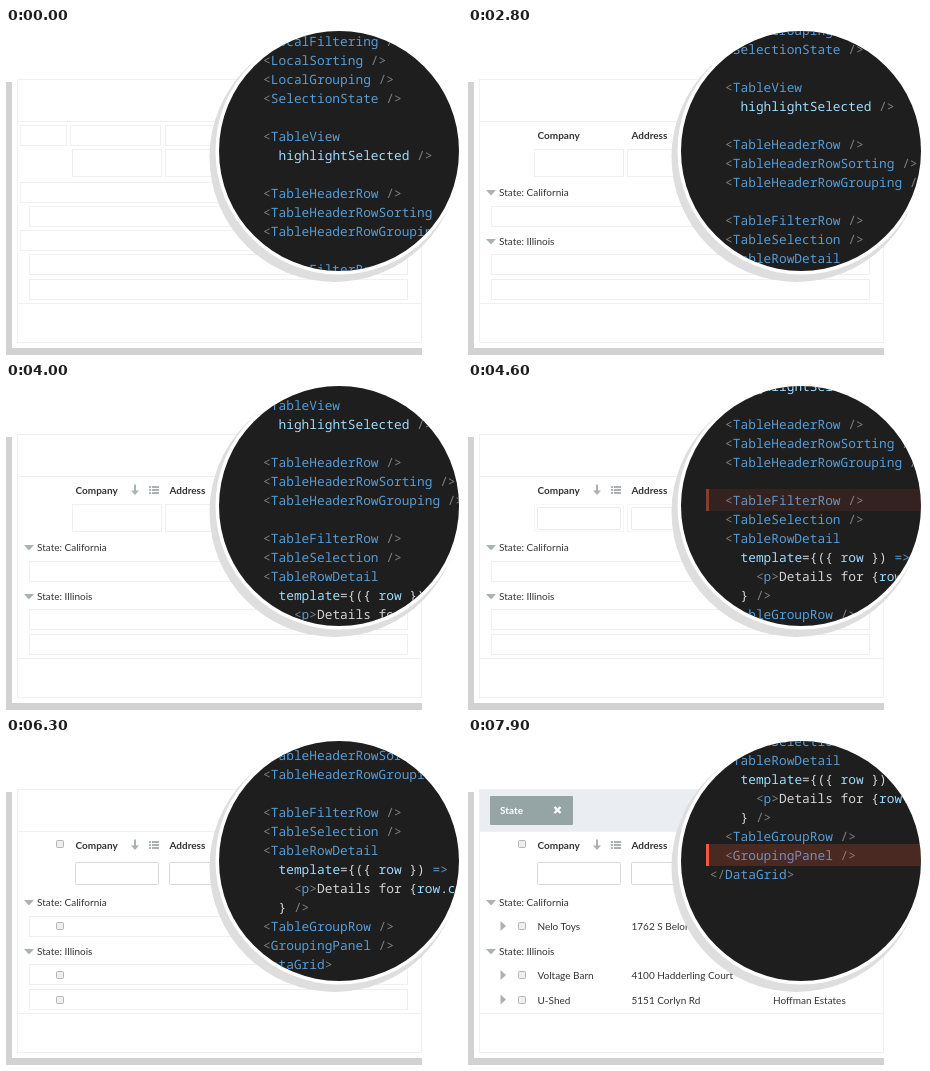
Recreate the animation shown at these times as an HTML page. Size 456 by 327 pixels, loop 8000 ms.

```html
<!DOCTYPE html>
<html lang="en">
<head>
<meta charset="utf-8">
<title>Data grid features</title>
<style>
  html, body { margin: 0; width: 100%; height: 100%; overflow: hidden; background: #fff; }
  svg { display: block; }
  text { white-space: pre; }
  .ui { font: 10px Lato, sans-serif; fill: #333; }
  .bold { font-weight: 700; }
  .code { font: 12.83px "Noto Sans Mono", "DejaVu Sans Mono", monospace; text-rendering: geometricPrecision; }
  .ghost { fill: none; stroke: #f0f0f0; }
  .icon { fill: #abb2b6; }
</style>
</head>
<body>
<svg id="stage" width="456" height="327" viewBox="0 0 456 327">
  <defs><clipPath id="lens"><circle cx="333" cy="123" r="120"/></clipPath></defs>
  <path d="M0 54H6V320H416V327H0Z" fill="#d2d2d2"/>
  <g id="grid"></g>
  <circle cx="328.5" cy="129" r="125" fill="#dedede"/>
  <circle cx="333" cy="123" r="123.5" fill="#fff"/>
  <circle cx="333" cy="123" r="120" fill="#1e1e1e"/>
  <g clip-path="url(#lens)">
    <g id="code"></g>
    <g id="mark">
      <rect class="band" x="238" width="218" fill="#f05037" fill-opacity=".21"/>
      <rect class="band" x="238" width="3" fill="#f25a3c"/>
    </g>
  </g>
</svg>
<script>
const LOOP = 8000, STEP = 100;
const $ = id => document.getElementById(id);

function add(parent, name, attrs = {}, text) {
  const el = document.createElementNS("http://www.w3.org/2000/svg", name);
  for (const key in attrs) el.setAttribute(key, attrs[key]);
  if (text !== undefined) el.textContent = text;
  return parent.appendChild(el);
}
const label = (parent, x, y, text, cls = "ui") => add(parent, "text", { x, y, class: cls }, text);
const path = (parent, d, cls = "icon") => add(parent, "path", { d, class: cls });
const box = (parent, x, y, right, bottom, attrs = { class: "ghost" }) =>
  add(parent, "rect", { x: x + .5, y: y + .5, width: right - x, height: bottom - y, ...attrs });

// Parts that fade in or out when a feature is switched on
const fades = [];
function part(at, show) {
  const el = add($("grid"), "g");
  fades.push({ el, at, show });
  return el;
}

const panel = part(7800, true);
add(panel, "rect", { x: 12, y: 52, width: 404, height: 42, fill: "#eaeef2" });
add(panel, "rect", { x: 22, y: 58, width: 83, height: 29, rx: 1, fill: "#95a5a5" });
label(panel, 32, 76, "State", "ui bold").style.fill = "#fff";
add(panel, "path", { d: "M86.5 69l6 6m0-6l-6 6", stroke: "#fff", "stroke-width": 2.4 });

box($("grid"), 11, 51, 415, 314);
path($("grid"), "M11 93.5H416M11 275.5H416", "ghost");

const headGhost = part(2200, false);
box(headGhost, 14, 97, 60, 117);
box(headGhost, 64, 97, 154, 117);
box(headGhost, 159, 97, 249, 117);

const filterGhost = part(4600, false);
box(filterGhost, 66, 121, 155, 148);
box(filterGhost, 159, 121, 249, 148);

const groupGhost = part(1000, false);
box(groupGhost, 14, 154, 401, 174);
box(groupGhost, 14, 202, 401, 222);

const rowGhost = part(6800, false);
for (const y of [178, 226, 251]) box(rowGhost, 23, y, 401, y + 20);

const groups = part(1000, true);
[[168, "State: California"], [217, "State: Illinois"]].forEach(([y, name]) => {
  path(groups, `M18 ${y - 6}h10l-5 5.5z`);
  label(groups, 31, y, name);
});

const head = part(2200, true);
label(head, 69.5, 110.5, "Company", "ui bold");
label(head, 163.5, 110.5, "Address", "ui bold");

const sorting = part(3400, true);
path(sorting, "M128 101.500h2v6h3l-4 4.500l-4-4.500h3z");
for (const y of [103, 106, 109]) path(sorting, `M143 ${y}h2v2h-2zM146 ${y}h7v2h-7z`);

const filters = part(4600, true);
for (const x of [69, 163])
  box(filters, x, 124, x + 83, 146, { fill: "#fff", stroke: "#d8d8d8", rx: 1 });

const checks = part(5600, true);
for (const y of [102, 184, 233, 258])
  box(checks, 50, y, 57, y + 7, { fill: "#efefef", stroke: "#b4b4b4", rx: 1 });

const rows = part(6800, true);
[
  [192, "Nelo Toys", "1762 S Belorva"],
  [241, "Voltage Barn", "4100 Hadderling Court"],
  [265.5, "U-Shed", "5151 Corlyn Rd", "Hoffman Estates"]
].forEach(([y, company, address, city = ""]) => {
  path(rows, `M32.500 ${y - 9}v10l5.500-5z`);
  label(rows, 69.5, y, company);
  label(rows, 163.5, y, address);
  label(rows, 305, y, city);
});

// Code listing: indent, then pairs of colour and text
const gray = "#808080", blue = "#569cd6", pale = "#9cdcfe", plain = "#d4d4d4";
const tag = (name, end = " />") => [2, gray, "<", blue, name, gray, end];
const listing = [
  tag("LocalFiltering"), tag("LocalSorting"), tag("LocalGrouping"), tag("SelectionState"), [0],
  tag("TableView", ""), [4, pale, "highlightSelected", gray, " />"], [0],
  tag("TableHeaderRow"), tag("TableHeaderRowSorting"), tag("TableHeaderRowGrouping"), [0],
  tag("TableFilterRow"), tag("TableSelection"), tag("TableRowDetail", ""),
  [4, pale, "template", plain, "={({ ", pale, "row", plain, " }) ", blue, "=>"],
  [6, gray, "<", blue, "p", gray, ">", plain, "Details for {", pale, "row", plain, ".", pale, "company", plain, "}"],
  [4, plain, "}", gray, " />"],
  tag("TableGroupRow"), tag("GroupingPanel"),
  [0, gray, "</", blue, "DataGrid", gray, ">"]
];
listing.forEach(([indent, ...runs], i) => {
  const line = label($("code"), 241.7 + indent * 7.7, 17.5 + i * 19, "", "code");
  for (let k = 0; k < runs.length; k += 2) add(line, "tspan", { fill: runs[k] }, runs[k + 1]);
});

// [start, duration, scroll position reached]
const scrolls = [
  [1600, 400, 49], [2800, 400, 86], [4000, 400, 124],
  [5200, 200, 143], [6200, 400, 238], [7400, 200, 257]
];
// [on, off, top, height]
const marks = [
  [1000, 1600, 96, 42], [2200, 2800], [3400, 4000], [4600, 5200],
  [5600, 6200], [6800, 7400], [7800, 8000]
];
const bands = document.querySelectorAll(".band");
const ramp = (t, at) => t < at ? 0 : t < at + STEP ? .5 : 1;

function draw(t) {
  for (const { el, at, show } of fades) {
    const k = ramp(t, at);
    el.setAttribute("opacity", show ? k : 1 - k);
  }
  let y = 0;
  for (const [at, span, to] of scrolls)
    y += (to - y) * Math.min(1, Math.max(0, (t - at) / span));
  $("code").setAttribute("transform", `translate(0 ${-Math.round(y)})`);

  const mark = marks.find(([on, off]) => t >= on && t < off);
  $("mark").setAttribute("opacity", mark ? ramp(t, mark[0]) : 0);
  if (mark) {
    const [, , top = 106, height = 22] = mark;
    for (const b of bands) {
      b.setAttribute("y", top);
      b.setAttribute("height", height);
    }
  }
}

const start = performance.now();
function frame() {
  const t = (performance.now() - start) % LOOP;
  draw(Math.floor(t / STEP) * STEP);
  requestAnimationFrame(frame);
}
frame();
</script>
</body>
</html>
```
